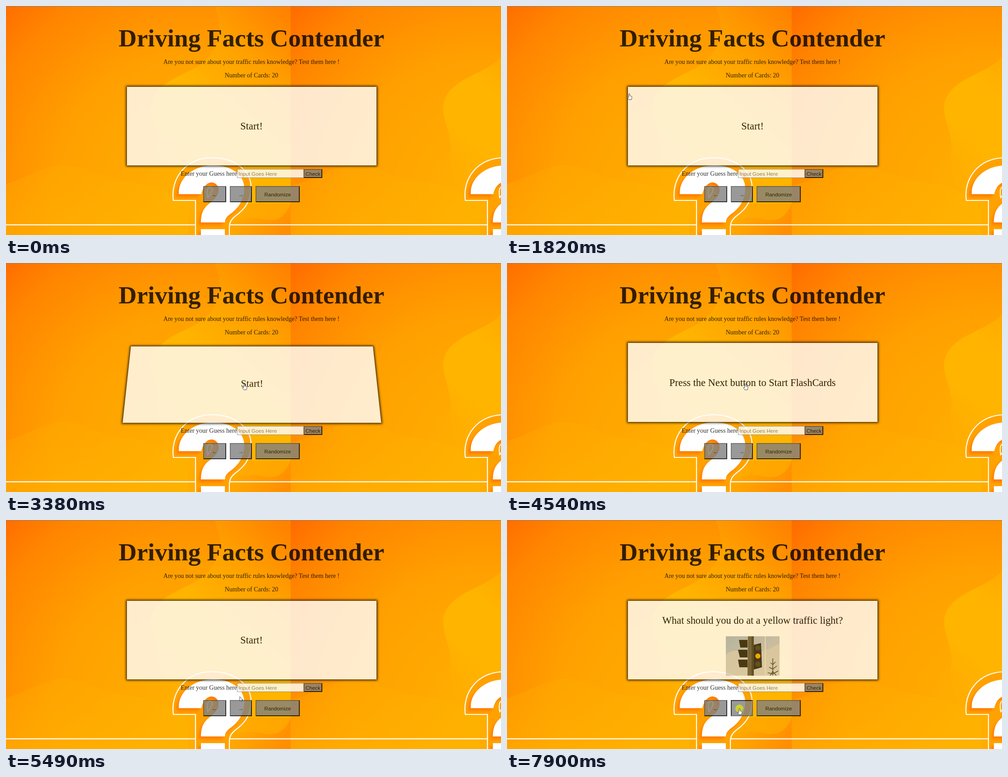
These frames come from a looping animation (1097x510 px, 8 s). An HTML page:

```html
<!DOCTYPE html>
<html lang="en">
<head>
<meta charset="utf-8">
<title>Driving Facts Contender</title>
<style>
  html, body { margin: 0; width: 100%; height: 100%; overflow: hidden; background: #ffa000; }
  svg, #ui { position: absolute; left: 0; top: 0; width: 1097px; height: 510px; }
  svg { overflow: visible; }
  text { font-family: "Liberation Serif", "Times New Roman", serif; font-size: 14px; text-anchor: middle; }
  #ui { opacity: .8; }
  #card {
    position: absolute; left: 267.5px; width: 553.5px; height: 175.5px;
    background: #fff; box-shadow: 0 0 5px 1.7px #000;
  }
  #card text { font-size: 22.35px; }
  #card svg { left: -267.5px; top: -179.5px; }
  .box {
    position: absolute; box-sizing: border-box; display: flex; align-items: center; justify-content: center;
    font: 11.65px "Liberation Sans", Arial, sans-serif; background: #808080; border: 2px outset #000;
  }
  .box.pressed { border-style: inset; }
  #field { justify-content: flex-start; padding-left: 2px; background: #fff; border: 1px solid #858585; color: #757575; }
</style>
</head>
<body>
<svg viewBox="0 0 1097 510">
  <defs>
    <radialGradient id="base" gradientUnits="userSpaceOnUse" cx="430" cy="420" r="620">
      <stop offset="0" stop-color="#ffb000"/><stop offset=".5" stop-color="#ffa000"/>
      <stop offset=".8" stop-color="#ff8500"/><stop offset="1" stop-color="#ff6600"/>
    </radialGradient>
    <linearGradient id="amber" gradientUnits="userSpaceOnUse" x1="647" y1="20" x2="314" y2="398">
      <stop offset="0" stop-color="#ff8200"/><stop offset=".26" stop-color="#ffa000"/>
      <stop offset=".52" stop-color="#ffb400"/><stop offset=".75" stop-color="#ffb400"/>
      <stop offset="1" stop-color="#ffac00" stop-opacity="0"/>
    </linearGradient>
    <linearGradient id="glow" x1="0" y1="0" x2="0" y2="1">
      <stop offset="0" stop-color="#ffb200" stop-opacity=".2"/><stop offset="1" stop-color="#ffb800" stop-opacity=".5"/>
    </linearGradient>
    <linearGradient id="ember" gradientUnits="userSpaceOnUse" x1="510" y1="440" x2="647" y2="510">
      <stop offset="0" stop-color="#ffae00"/><stop offset="1" stop-color="#ff8c00"/>
    </linearGradient>
    <linearGradient id="dusk" x1="0" y1="0" x2="0" y2="1">
      <stop offset="0" stop-color="#7a9aa2"/><stop offset=".5" stop-color="#4f86a6"/><stop offset="1" stop-color="#5d7f91"/>
    </linearGradient>
    <linearGradient id="haze" x1="0" y1="0" x2="1" y2="1">
      <stop offset="0" stop-color="#a4b4c6"/><stop offset=".5" stop-color="#bcc0c6"/><stop offset="1" stop-color="#cdc6be"/>
    </linearGradient>
    <filter id="soft" x="-20%" y="-20%" width="140%" height="140%"><feGaussianBlur stdDeviation="3"/></filter>
    <clipPath id="tileClip"><path d="M0 0H647V510H0Z"/></clipPath>
    <clipPath id="redClip"><path d="M466.5 259H622V346.5H466.5Z"/></clipPath>
    <clipPath id="yellowClip"><path d="M485 259H604V346.5H485Z"/></clipPath>
    <path id="mark" d="M399 419C397 384 430 355 475 355C519 355 545 378 544 408C543 438 525 455 512 464Q501 472 501 482H448C448 452 461 445 471 436C482 427 490 417 486 403C478 386 455 390 449 419ZM448 497H501V515H448Z"/>
    <g id="tile" clip-path="url(#tileClip)">
      <path fill="url(#base)" d="M0 0H647V510H0Z"/>
      <path fill="url(#amber)" d="M478 0C498 45 492 85 462 118C425 154 347 163 338 220C334 255 360 285 353 330C349 380 370 420 400 440H647V0Z"/>
      <path fill="url(#glow)" d="M0 400C50 390 80 365 130 355C160 350 190 362 220 375C280 400 350 385 420 440V510H0Z"/>
      <path fill="url(#ember)" d="M505 490C540 462 570 474 600 477Q632 478 647 440V510H505Z"/>
      <path fill="#fff8e8" d="M0 486H436V488.5H0ZM511 486H647V488.5H511Z"/>
      <path fill="#ffa200" stroke="#fff" stroke-width="2.2" d="M387 433C380 385 414 338 472 338C527 338 561 370 559 408C557 441 540 456 524 468Q511 478 511 491V515H436V433Z"/>
      <use href="#mark" x="-5" y="6" fill="#ff7c00" filter="url(#soft)"/>
      <use href="#mark" fill="#fff"/>
      <path fill="none" stroke="#fff" stroke-width="2" d="M463 427Q460 405 467 403 475 404 472 413 469 420 463 427Z"/>
    </g>
  </defs>
  <use href="#tile" x="-16"/>
  <use href="#tile" x="631"/>
  <path fill="#8a8578" d="M0 0H1097V1H0Z"/>
</svg>

<div id="ui">
  <svg viewBox="0 0 1097 510">
    <text x="544" y="90" style="font-size:55.5px;font-weight:bold">Driving Facts Contender</text>
    <text x="544" y="129">Are you not sure about your traffic rules knowledge? Test them here !</text>
    <text x="544" y="158.5">Number of Cards: 20</text>
    <text x="449.7" y="377.5">Enter your Guess here</text>
  </svg>
  <div class="box" id="field" style="left:512px;top:363px;width:148px;height:20px">Input Goes Here</div>
  <div class="box" style="left:660px;top:363px;width:40.5px;height:20px">Check</div>
  <div class="box" style="left:437px;top:401px;width:50.5px;height:36px">←</div>
  <div class="box" id="next" style="left:496px;top:401px;width:49px;height:36px">→</div>
  <div class="box" style="left:553px;top:401px;width:98px;height:36px">Randomize</div>

  <div id="card">
    <svg viewBox="0 0 1097 510">
      <g class="face"><text x="544.2" y="275">Start!</text></g>
      <g class="face"><text x="544.2" y="275">Press the Next button to Start FlashCards</text></g>
      <g class="face">
        <text x="544.2" y="231">What does a red traffic light mean?</text>
        <g clip-path="url(#redClip)">
          <path fill="url(#dusk)" d="M466 259H622V347H466Z"/>
          <path fill="#3d3c2c" opacity=".65" d="M466 300Q480 292 488 308T505 325V347H466ZM558 325Q590 332 622 318V347H558Z"/>
          <g fill="none" stroke="#29291f">
            <path d="M466 268Q492 272 520 262M476 347Q480 305 470 275M488 347Q484 310 496 280M478 310L496 290M622 292Q590 285 556 259M622 276L592 262M605 288Q585 297 560 296M592 282L575 262M612 290L596 310"/>
          </g>
          <path fill="#17180f" d="M524 262Q540 256 556 264L558 347H528V343L500 339Q498 325 508 321L527 325V316L503 313Q501 300 510 297L526 302Z"/>
          <ellipse cx="537" cy="272" rx="14.5" ry="12" fill="#c92a1a"/>
          <path fill="#731d12" d="M524 276Q538 266 552 277L550 284H528Z"/>
          <circle cx="541" cy="286" r="11" fill="#e8321f"/>
          <ellipse cx="542" cy="289" rx="4" ry="2.5" fill="#ffc0a0"/>
        </g>
      </g>
      <g class="face">
        <text x="544.2" y="231">What should you do at a yellow traffic light?</text>
        <g clip-path="url(#yellowClip)">
          <path fill="url(#haze)" d="M485 259H604V347H485Z"/>
          <path fill="#d8d0c8" opacity=".7" d="M485 300Q500 285 525 295T604 275V347H485Z"/>
          <path fill="#5a5444" d="M534 259H547V347H533Z"/>
          <path fill="#3b382e" d="M542 259H547V347H542Z"/>
          <path fill="#1d1c18" d="M514 267H533V284H517ZM512 289H533V306H516ZM512 311H533V328H515ZM547 278L563 274 565 328 547 333Z"/>
          <g fill="#3d382c"><circle cx="556" cy="285" r="6"/><circle cx="556" cy="321" r="6"/></g>
          <circle cx="556" cy="303" r="5.7" fill="#f0a400"/>
          <path stroke="#e5e0d8" stroke-width="2" d="M572.5 259V347"/>
          <path fill="none" stroke="#36382e" stroke-width="1.5" d="M589 308V347M584 318L589 322 595 316M581 328L589 332 598 325M578 340L589 343 601 336M583 347L589 337 597 347"/>
        </g>
      </g>
    </svg>
  </div>
</div>

<svg viewBox="0 0 1097 510">
  <g id="cursor">
    <circle id="click" r="9" fill="#dce60a" opacity=".75"/>
    <path id="pointer" fill="#fff" stroke="#222" stroke-width=".8" stroke-linejoin="round"/>
  </g>
</svg>

<script>
const $ = id => document.getElementById(id);
const LOOP = 8000, STEP = 200 / 3, FLIP = 122;
const faces = [...document.querySelectorAll('.face')];
const shapes = {
  arrow: 'M0 0V10L2.3 8 4 11.2 5.4 10.6 3.9 7.3H7Z',
  hand: 'M-1.2 .6Q0-.8 1.2 .6V5L5 6Q6.3 6.6 6 8.5L5 13.5H-1L-4 9Q-4.3 7.3-1.2 8.8Z',
  beam: 'M-2-5H2M0-5V5M-2 5H2'
};
// time, x, y of the pointer's hot spot
const path = [
  [70, 1009, 480], [140, 1009, 480], [500, 760, 440], [800, 520, 420], [933, 486, 417],
  [1000, 500, 408], [1130, 512, 392], [1400, 400, 300], [1600, 270, 243], [1733, 267, 212],
  [1820, 272, 190], [1930, 318, 177], [2000, 380, 177], [2200, 500, 230], [2400, 540, 330],
  [2530, 545, 372], [2600, 543, 360], [2660, 540, 312], [2940, 528, 269], [4900, 528, 269],
  [5250, 523, 350], [5600, 515, 420], [LOOP, 515, 420]
];
const clicks = [[3210, 3330], [4400, 4540], [6100, 6240], [7030, 7160], [7900, LOOP]];
const inside = (x, y, l, t, r, b) => x >= l && x <= r && y >= t && y <= b;

function pointerAt(t) {
  const i = Math.max(1, path.findIndex(p => p[0] >= t));
  const [t0, x0, y0] = path[i - 1], [t1, x1, y1] = path[i];
  const k = Math.max(0, (t - t0) / (t1 - t0));
  return [x0 + (x1 - x0) * k, y0 + (y1 - y0) * k];
}

// CSS "ease" curve, solved by bisection
function ease(x) {
  if (x <= 0 || x >= 1) return x <= 0 ? 0 : 1;
  let lo = 0, hi = 1, s;
  for (let i = 0; i < 14; i++) {
    s = (lo + hi) / 2;
    if (.75 * s * (1 - s) + s ** 3 < x) lo = s; else hi = s;
  }
  return .3 * s * (1 - s) ** 2 + 3 * s * s * (1 - s) + s ** 3;
}

function shapeAt(x, y) {
  if (inside(x, y, 267, 179, 821, 355)) return 'hand';
  if (inside(x, y, 437, 401, 487, 437) || inside(x, y, 496, 401, 545, 437)) return 'hand';
  return inside(x, y, 512, 363, 660, 383) ? 'beam' : 'arrow';
}

function draw(t) {
  const sampled = Math.floor(t / STEP + .01) * STEP;
  const angle = 180 * (ease((sampled - 3322) / FLIP) - ease((sampled - 4579) / FLIP));
  const flipped = angle > 90;
  const tilt = flipped ? angle - 180 : angle;
  const shown = t >= 7160 ? 3 : t >= 6240 ? 2 : flipped ? 1 : 0;
  $('card').style.top = (flipped ? 178.3 : 179.5) + 'px';
  $('card').style.transform = Math.abs(tilt) < .01 ? 'none' : `perspective(694px) rotateX(${tilt}deg)`;
  faces.forEach((face, i) => face.style.display = i === shown ? '' : 'none');

  const [x, y] = pointerAt(sampled);
  const clicking = clicks.some(([on, off]) => t >= on && t < off);
  $('cursor').style.display = t < 70 ? 'none' : '';
  $('cursor').setAttribute('transform', `translate(${x} ${y})`);
  $('pointer').setAttribute('d', shapes[shapeAt(x, y)]);
  $('click').style.display = clicking ? '' : 'none';
  $('next').classList.toggle('pressed', clicking && t > 6000);
}

const start = performance.now();
function tick() {
  draw((performance.now() - start) % LOOP);
  requestAnimationFrame(tick);
}
tick();
</script>
</body>
</html>
```
